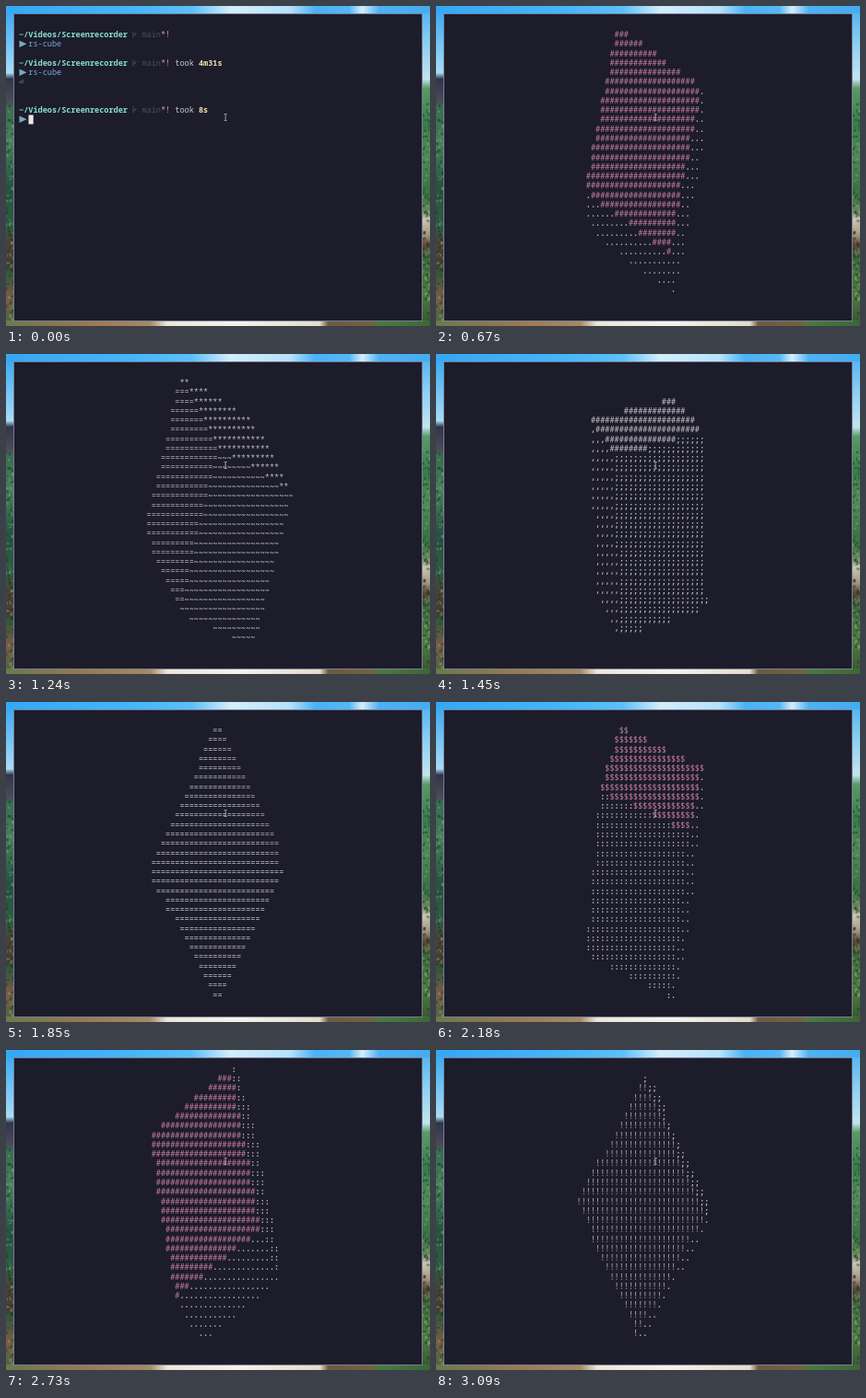
These frames come from a looping animation (460 by 348 pixels, 3.12 s). An HTML page with a canvas:

```html
<!DOCTYPE html>
<html lang="en">
<head>
<meta charset="utf-8">
<title>Terminal cube</title>
<style>
html, body { margin: 0; width: 100%; height: 100%; overflow: hidden; background: #1d1c2b; }
canvas { display: block; width: 460px; height: 348px; }
</style>
</head>
<body>
<canvas id="stage"></canvas>
<script>
const W = 460, H = 348, LOOP = 3120, START = 30;
const CELL_W = 5.13, CELL_H = 10.27, LEFT = 14, TOP = 31;
const FONT = '"Noto Sans Mono", "DejaVu Sans Mono", monospace';
const RAMP = '.,-~:;=!*#$@';
const HALF = 9.05, CAMERA = 200, MID_COL = 41.4, MID_ROW = 13.7, STEPS = 24;

// time in ms, then pitch, yaw and roll in degrees
const POSES = [
  [30, -34, 4, 80],
  [670, 11, 8, 160],
  [1000, 33, 11.5, 208],
  [1450, 74, 14, 274],
  [2180, 115, -6, 346],
  [2450, 144, -10, 365.5],
  [3090, 177, -4, 402]
];

const canvas = document.getElementById('stage');
const ratio = window.devicePixelRatio || 1;
canvas.width = W * ratio;
canvas.height = H * ratio;
const ctx = canvas.getContext('2d');
ctx.scale(ratio, ratio);

function slope(i, k) {
  const a = POSES[Math.max(i - 1, 0)], b = POSES[Math.min(i + 1, POSES.length - 1)];
  return (b[k] - a[k]) / (b[0] - a[0]);
}

function poseAt(t) {
  t = Math.min(t, POSES[POSES.length - 1][0]);
  let i = 0;
  while (i < POSES.length - 2 && t >= POSES[i + 1][0]) i++;
  const p = POSES[i], q = POSES[i + 1], span = q[0] - p[0], u = (t - p[0]) / span;
  const u2 = u * u, u3 = u2 * u;
  return [1, 2, 3].map(k =>
    ((2 * u3 - 3 * u2 + 1) * p[k] + (3 * u2 - 2 * u3) * q[k] +
     span * ((u3 - 2 * u2 + u) * slope(i, k) + (u3 - u2) * slope(i + 1, k))) * Math.PI / 180);
}

// The cube's three axes on screen: x right, y up, z towards the viewer.
function axesAt(t) {
  const [a, b, c] = poseAt(t);
  const sa = Math.sin(a), ca = Math.cos(a), sb = Math.sin(b), cb = Math.cos(b);
  const sc = Math.sin(c), cc = Math.cos(c);
  const roll = (x, y, z) => [x * cc - y * sc, x * sc + y * cc, z];
  return [roll(cb, 0, -sb), roll(sb * sa, ca, cb * sa), roll(sb * ca, -sa, cb * ca)];
}

function rect(color, x, y, w, h) {
  ctx.fillStyle = color;
  ctx.fillRect(x, y, w, h);
}

function strip(x, y, w, h, stops) {
  const g = w > h ? ctx.createLinearGradient(x, 0, x + w, 0) : ctx.createLinearGradient(0, y, 0, y + h);
  stops.forEach(([at, color]) => g.addColorStop(at, color));
  rect(g, x, y, w, h);
}

// Loose leaves over the garden at both sides.
function drawLeaves() {
  let seed = 7;
  const rnd = () => (seed = seed * 16807 % 2147483647) / 2147483647;
  for (let i = 0; i < 260; i++) {
    const x = (i % 2 ? 451 : 0) + rnd() * 8, y = 104 + rnd() * 240;
    rect(rnd() < .6 ? 'rgba(16,40,34,.4)' : 'rgba(150,190,120,.35)', x, y, 1 + rnd() * 2, 1 + rnd() * 3);
  }
}

function drawDesktop() {
  strip(0, 0, W, 10, [[0, '#35a8f6'], [.3, '#45b6fb'], [.44, '#5cc0fa'], [.53, '#d4eefb'],
    [.67, '#b5e1fa'], [.73, '#48b2f6'], [.81, '#55b8f6'], [.84, '#d8eefa'], [.88, '#4cb2f4'], [1, '#45acf0']]);
  strip(0, 8, 9, H - 8, [[0, '#3cabf4'], [.19, '#a9dcf6'], [.21, '#30364a'], [.28, '#4b4a58'],
    [.3, '#3b6d52'], [.42, '#45805a'], [.55, '#285444'], [.68, '#2f5c43'], [.73, '#4a4438'],
    [.8, '#463c30'], [.83, '#34573b'], [.91, '#7a5c45'], [1, '#4a6440']]);
  strip(451, 8, 9, H - 8, [[0, '#56b6f2'], [.1, '#8fd0f2'], [.21, '#c4e4ee'], [.24, '#5a9a66'], [.35, '#3c7c4a'],
    [.46, '#4f8c54'], [.58, '#376e40'], [.63, '#6a8a58'], [.66, '#cfc8b8'], [.71, '#a8937a'],
    [.74, '#5b4636'], [.79, '#3f6a3c'], [.9, '#50793f'], [1, '#35552f']]);
  drawLeaves();
  strip(0, 342, W, 6, [[0, '#6b7a4c'], [.1, '#84784e'], [.2, '#9a7a52'], [.34, '#a58a64'],
    [.38, '#ece6da'], [.55, '#f6f2ea'], [.74, '#e4dccb'], [.76, '#6f5a42'], [.86, '#72603f'],
    [.88, '#4a7a42'], [1, '#3d6637']]);
  rect('#767c96', 8, 8, 444, 335);
  rect('#1d1c2b', 9, 9, 442, 333);
}

function put(text, col, y, color, bold) {
  ctx.font = (bold ? 'bold ' : '') + '8.55px ' + FONT;
  ctx.textAlign = 'left';
  ctx.fillStyle = color;
  ctx.fillText(text, LEFT + col * CELL_W, y + 3);
}

function drawBranch(x, y) {
  ctx.strokeStyle = '#55586c';
  ctx.lineWidth = .8;
  ctx.beginPath();
  ctx.moveTo(x, y - 3.5);
  ctx.lineTo(x, y + 3.5);
  ctx.moveTo(x, y + 1);
  ctx.quadraticCurveTo(x + 3, y + 1, x + 3, y - 2);
  ctx.stroke();
}

function drawPrompt(y, took, command) {
  put('~/Videos/Screenrecorder', 0, y, '#8be0d8', true);
  drawBranch(138, y);
  put('main', 26, y, '#4b4d60');
  put('*', 30, y, '#e79ab4');
  put('!', 31, y, '#d98ba8');
  if (took) {
    put('took', 33, y, '#c3c8da');
    put(took, 38, y, '#f1dfaa', true);
  }
  const m = y + CELL_H;
  ctx.fillStyle = '#79aac0';
  ctx.beginPath();
  ctx.moveTo(14.5, m - 3.8);
  ctx.lineTo(22.5, m);
  ctx.lineTo(14.5, m + 3.8);
  ctx.fill();
  put(command, 2, m, '#78aadd');
}

function drawShell() {
  drawPrompt(31, '', 'rs-cube');
  drawPrompt(62, '4m31s', 'rs-cube');
  put('⏎', 0, 82, '#a0a4b4');
  drawPrompt(113, '8s', '');
  rect('#e9e6e4', 24.5, 118.5, 5.2, 10);
}

function faceInk(axis, light) {
  if (axis < 2) return '#c3c2c8';
  return light > 8 ? '#c47c9e' : '#b9a9b5';
}

// Each cell shows the face whose sample lies closest to the cell's middle.
function drawCube(t) {
  const axes = axesAt(t), cells = new Map();
  for (let f = 0; f < 6; f++) {
    const axis = f >> 1, side = f % 2 ? -1 : 1;
    const n = axes[axis], u = axes[(axis + 1) % 3], v = axes[(axis + 2) % 3];
    if (side * n[2] * CAMERA <= HALF) continue;
    const light = Math.max(0, Math.floor(8 * side * (n[1] + n[2])));
    const glyph = { ch: RAMP[Math.min(light, 11)], ink: faceInk(axis, light), bold: light < 6 };
    for (let i = -STEPS; i <= STEPS; i++) {
      for (let j = -STEPS; j <= STEPS; j++) {
        const [x, y, z] = n.map((c, k) => HALF * (side * c + (i * u[k] + j * v[k]) / STEPS));
        const zoom = CAMERA / (CAMERA - z);
        const px = MID_COL + x * zoom, py = MID_ROW - y * zoom;
        const col = Math.round(px), row = Math.round(py), off = Math.hypot(px - col, py - row);
        const key = row * 100 + col, old = cells.get(key);
        if (!old || off < old.off) cells.set(key, { col, row, off, glyph });
      }
    }
  }
  ctx.textAlign = 'center';
  cells.forEach(({ col, row, glyph }) => {
    ctx.font = (glyph.bold ? 'bold ' : '') + '8.55px ' + FONT;
    ctx.fillStyle = glyph.ink;
    ctx.fillText(glyph.ch, LEFT + (col + .5) * CELL_W, TOP + row * CELL_H + 3);
  });
}

function drawPointer() {
  rect('#a9a9b3', 237.7, 117.5, .9, 7);
  rect('#a9a9b3', 236.5, 117, 3.2, .8);
  rect('#a9a9b3', 236.5, 124.2, 3.2, .8);
}

function render(now) {
  const t = Math.max(0, now - begin) % LOOP;
  drawDesktop();
  if (t < START) drawShell();
  else drawCube(t);
  drawPointer();
  requestAnimationFrame(render);
}

const begin = performance.now();
render(begin);
</script>
</body>
</html>
```
